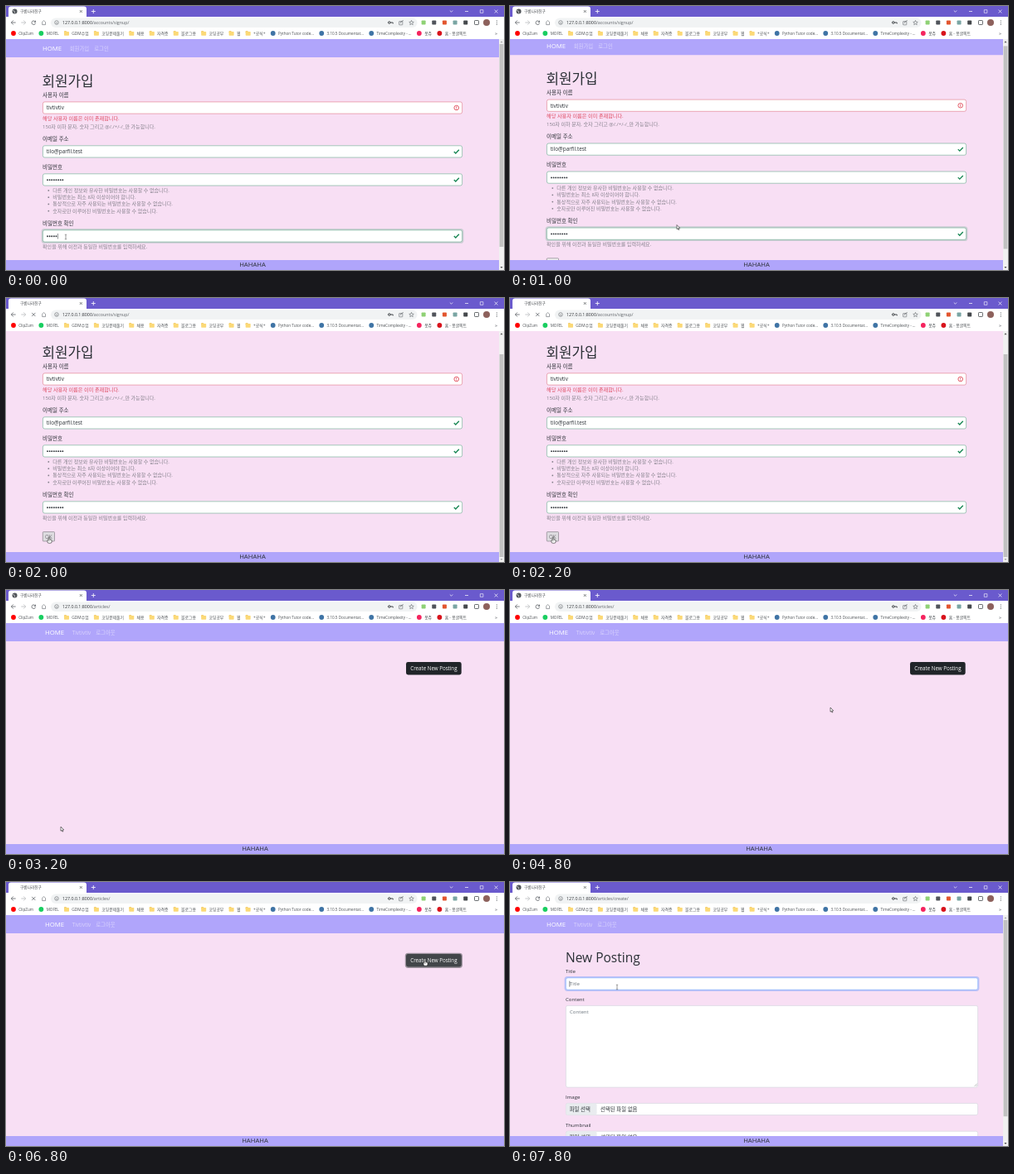
An HTML page with a canvas that plays this animation: 600x319 px, repeating every 8 s.

```html
<!DOCTYPE html>
<html lang="ko">
<head>
<meta charset="utf-8">
<title>Sign-up flow</title>
<style>
html, body { margin: 0; width: 100%; height: 100%; overflow: hidden; }
canvas { display: block; width: 600px; height: 319px; }
</style>
</head>
<body>
<canvas id="stage" width="600" height="319"></canvas>
<script>
const ctx = document.getElementById('stage').getContext('2d');
const LOOP = 8000, STEP = 200;
const FONT = '"Open Sans", "Noto Sans CJK KR", "Noto Sans CJK", sans-serif';
const PURPLE = '#6a5acd', LILAC = '#b0a5fb', PINK = '#f8dff4';
const INK = '#2b3036', MUTED = '#85808c', GREY = '#5f6368', CHROME = '#45494d';
const GREEN = '#198754', RED = '#dc3545';
const BUSY = [[2000, 3200], [6400, 7200]];
const OPEN_ARTICLES = 2400, OPEN_POSTING = 7000, FOCUS_TITLE = 7600;

// [start, end, x, y]: the pointer travels to x, y between the two times.
const moves = [
  [600, 1000, 201, 264.5], [1000, 1800, 52, 289], [2400, 2600, 66, 286],
  [4200, 4800, 386, 142], [4800, 5200, 452, 73], [5200, 5400, 432, 144],
  [5400, 6000, 505, 94], [7000, 7600, 129, 127]
];

const bookmarks = [
  ['ClipZum', '#f00'], ['MOFEL', '#19ce60'], ['GDM수업'], ['코딩문제풀기'], ['채용'],
  ['자격증'], ['블로그용'], ['코딩공부'], ['웹'], ['+공식+'],
  ['Python Tutor code...', '#3f74a5'], ['3.10.5 Documentat...', '#3f74a5'],
  ['TimeComplexity - ...', '#3f74a5'], ['봇쥬', '#f5245f'], ['홈 - 몽글픽트', '#d8131c']
];

const groups = [
  { label: '사용자 이름', value: 'tivtivtiv', error: '해당 사용자 이름은 이미 존재합니다.',
    hints: ['150자 이하 문자, 숫자 그리고 @/./+/-/_만 가능합니다.'] },
  { label: '이메일 주소', value: 'tilo@parfil.test' },
  { label: '비밀번호', secret: true, list: true, hints: [
    '다른 개인 정보와 유사한 비밀번호는 사용할 수 없습니다.',
    '비밀번호는 최소 8자 이상이어야 합니다.',
    '통상적으로 자주 사용되는 비밀번호는 사용할 수 없습니다.',
    '숫자로만 이루어진 비밀번호는 사용할 수 없습니다.'] },
  { label: '비밀번호 확인', secret: true, typed: true,
    hints: ['확인을 위해 이전과 동일한 비밀번호를 입력하세요.'] }
];

const clamp01 = v => Math.min(1, Math.max(0, v));
const progress = (t, from, to) => clamp01((t - from) / (to - from));
const between = (t, from, to) => t >= from && t < to;

// Text is placed by its left edge and optical middle.
function text(str, x, y, size, color = INK, align = 'left', weight = 400) {
  ctx.font = `${weight} ${size}px ${FONT}`;
  ctx.textAlign = align;
  ctx.fillStyle = color;
  ctx.fillText(str, x, y + size * 0.36);
  return ctx.measureText(str).width;
}

function rect(x, y, w, h, color) {
  ctx.fillStyle = color;
  ctx.fillRect(x, y, w, h);
}

function paint(fill, stroke, width = 0.6) {
  if (fill) { ctx.fillStyle = fill; ctx.fill(); }
  if (stroke) { ctx.strokeStyle = stroke; ctx.lineWidth = width; ctx.stroke(); }
}

function box(x, y, w, h, r, fill, stroke, width) {
  ctx.beginPath();
  ctx.roundRect(x, y, w, h, r);
  paint(fill, stroke, width);
}

function circle(x, y, r, fill, stroke, width) {
  ctx.beginPath();
  ctx.arc(x, y, r, 0, Math.PI * 2);
  paint(fill, stroke, width);
}

function line(color, width, ...points) {
  ctx.beginPath();
  for (const [x, y] of points) ctx.lineTo(x, y);
  paint(null, color, width);
}

function polygon(fill, stroke, ...points) {
  ctx.beginPath();
  for (const [x, y] of points) ctx.lineTo(x, y);
  ctx.closePath();
  paint(fill, stroke);
}

function cross(x, y, r, color, width = 0.7) {
  for (const s of [-1, 1]) line(color, width, [x - r, y - r * s], [x + r, y + r * s]);
}

// Arrow centred on x, y; dir is -1 for left and 1 for right.
function arrow(x, y, dir, color) {
  const tip = x + 2.7 * dir, back = x + 0.1 * dir;
  line(color, 0.8, [x - 2.7 * dir, y], [tip, y]);
  line(color, 0.8, [back, y - 2.6], [tip, y], [back, y + 2.6]);
}

function star(x, y, r) {
  const points = Array.from({ length: 10 }, (_, i) => {
    const a = (i / 5 - 0.5) * Math.PI, d = i % 2 ? r * 0.45 : r;
    return [x + d * Math.cos(a), y + d * Math.sin(a)];
  });
  polygon(null, GREY, ...points);
}

function drawTabs(loading) {
  rect(0, 0, 600, 13, PURPLE);
  box(3, 0.5, 94, 15, 3, '#fff');
  if (!loading) {
    circle(10.5, 6.5, 3, '#51555a');
    line('#fff', 0.6, [8.3, 5.4], [10, 6], [10.7, 8.6]);
  }
  text('구름나라친구', 17, 6.3, 4.7, CHROME);
  cross(90.3, 6.5, 1.4, CHROME);
  line('#fff', 0.8, [102.8, 6.5], [107.8, 6.5]);
  line('#fff', 0.8, [105.3, 4], [105.3, 9]);
  line('#fff', 0.7, [534.8, 5.5], [536.5, 7.2], [538.2, 5.5]);
  line('#fff', 0.7, [553, 6.5], [557, 6.5]);
  box(571.3, 4.7, 3.6, 3.6, 0, null, '#fff');
  cross(590.5, 6.5, 1.9, '#fff');
}

function drawToolbar(path, loading) {
  rect(0, 13, 600, 27, '#fff');
  arrow(9, 20, -1, GREY);
  arrow(21, 20, 1, '#b9bbbe');
  if (loading) cross(33.3, 20, 2.1, GREY, 0.8);
  else {
    ctx.beginPath();
    ctx.arc(33.3, 20.2, 2.3, 0.2, 5.4);
    paint(null, GREY, 0.8);
    polygon(GREY, null, [35.9, 17.2], [35.9, 19.8], [33.4, 19.8]);
  }
  polygon(null, GREY, [43.7, 22.6], [43.7, 19.4], [45.6, 17.6], [47.5, 19.4], [47.5, 22.6]);

  box(54, 14.5, 441.5, 11.5, 5.75, '#f1f3f4');
  circle(61, 20, 2.3, null, GREY);
  rect(60.7, 19.6, 0.7, 1.8, GREY);
  const host = text('127.0.0.1:8000', 68, 20, 5.3, '#33363a');
  text(path, 68 + host, 20, 5.3, GREY);

  circle(461.8, 20, 1.3, null, CHROME, 1);
  line(CHROME, 1, [463, 20], [466.2, 20], [466.2, 21.4]);
  box(473.6, 18.6, 4.2, 4.2, 0.4, null, GREY);
  line(GREY, 0.7, [475.4, 20.8], [476, 18.8], [478.8, 17.6]);
  star(488.5, 20.3, 2.9);

  ['#8fd175', '#51545b', '#e2562f', '#79a5a3', CHROME].forEach((color, i) =>
    box(500.6 + i * 12.65, 17.5, 5, 5, 0.8, color));
  box(564.5, 17.5, 5, 5, 0.7, null, CHROME, 0.8);
  circle(579, 20, 4, '#8d615c');
  for (const dy of [-2.2, 0, 2.2]) circle(591.3, 20 + dy, 0.6, GREY);
}

function drawBookmarks() {
  let x = 9;
  for (const [label, color] of bookmarks) {
    if (color) circle(x, 33, 2.9, color);
    else {
      box(x - 3, 30.2, 3, 2, 0.5, '#f0c04c');
      box(x - 3, 30.9, 6, 4.8, 0.6, '#fbd977');
    }
    const size = /[가-힣]/.test(label) ? 4.85 : 4.6;
    x += 6.3 + text(label, x + 6.3, 33, size, '#4c5054') + 9.3;
  }
  text('»', 590.5, 32.6, 6, GREY, 'center');
}

function drawNav(left, links) {
  rect(0, 40, 600, 22, LILAC);
  let x = left + text('HOME', left, 51.3, 7.8, '#fff') + 9.5;
  for (const link of links) x += text(link, x, 51.3, 6.4, '#d9d3fd') + 6;
}

function drawFooter(width) {
  rect(0, 307, width, 12, LILAC);
  text('HAHAHA', width / 2, 312.2, 7.7, INK, 'center');
}

function drawScrollbar(offset, hidden) {
  const view = 279, total = view + hidden, scale = (view - 12) / total;
  rect(594, 40, 6, view, '#f1f1f1');
  rect(594.6, 46 + offset * scale, 4.8, view * scale, '#c1c1c1');
  for (const [y, dir, off] of [[43.3, -1, offset === 0], [316.1, 1, offset === hidden]])
    polygon(off ? '#a3a3a3' : '#505050', null,
      [595.5, y - dir], [598.5, y - dir], [597, y + dir]);
}

function drawField(x, y, w, border, glow, h = 15) {
  if (glow) box(x - 1.4, y - 1.4, w + 2.8, h + 2.8, 3.6, glow);
  box(x + 0.4, y + 0.4, w - 0.8, h - 0.8, 2.2, '#fff', border);
}

// One labelled form row; returns the label position of the next row.
function drawGroup(group, y, t) {
  const top = y + 8, mid = top + 7.5;
  const focused = group.typed && t < 1800;
  text(group.label, 44, y, 6.5);
  drawField(44, top, 506, group.error ? '#e07886' : '#69a98f', focused && 'rgba(25,135,84,.2)');

  if (group.secret) {
    const count = group.typed ? Math.min(8, 5 + t / STEP) : 8;
    for (let i = 0; i < count; i++) circle(50 + i * 2.62, mid + 0.3, 0.9, INK);
    if (focused && t < 800) rect(49.2 + count * 2.62, mid - 3, 0.5, 6.5, INK);
  } else text(group.value, 48.7, mid, 6.4);

  if (group.error) {
    circle(542.7, mid, 2.8, null, RED, 0.8);
    rect(542.3, mid - 1.6, 0.8, 2, RED);
    rect(542.3, mid + 1, 0.8, 0.8, RED);
  } else line(GREEN, 1.4, [539.8, mid], [541.8, mid + 2], [545.8, mid - 2.2]);

  let row = top + 20.3;
  if (group.error) {
    text(group.error, 44, row, 6.15, '#de4a60');
    row += 9.6;
  }
  if (!group.hints) return top + 26;
  for (const hint of group.hints) {
    if (group.list) circle(51.3, row + 0.2, 0.9, MUTED);
    text(hint, group.list ? 56.3 : 44, row, 6.05, MUTED);
    row += 8.25;
  }
  return row + 6.75;
}

function drawSignup(t) {
  const scroll = 25 * progress(t, 800, 1400) ** 2;
  const pressed = t >= 1800;
  ctx.save();
  ctx.translate(0, -scroll);
  drawNav(44, ['회원가입', '로그인']);
  text('회원가입', 43.5, 91, 16.9, INK, 'left', 300);
  let y = 107.5;
  for (const group of groups) y = drawGroup(group, y, t);
  box(44.3, 307.6, 14.2, 11.3, 0.8, pressed ? '#dedce0' : '#efefef', '#77737b');
  text('OK', 51.2, 313.4, 6.2, pressed ? '#77747b' : INK, 'center');
  ctx.restore();
  drawFooter(594);
  drawScrollbar(scroll, 25);
}

function drawArticles(t) {
  drawNav(47, ['Tivtivtiv', '로그아웃']);
  if (t >= 6400) box(480.8, 85.7, 69.2, 18.2, 3.6, 'rgba(66,70,73,.5)');
  box(482, 87, 66.7, 15.5, 2.4, t >= 6000 ? '#424649' : '#212529');
  text('Create New Posting', 515.4, 95, 6.2, '#fff', 'center');
  drawFooter(600);
}

function drawFilePicker(label, y) {
  text(label, 67, y, 6.1);
  drawField(67, y + 7.2, 497, '#ced4da');
  box(67.6, y + 7.8, 37, 13.8, 2, '#e9ecef');
  text('파일 선택', 71.7, y + 14.7, 6.4);
  text('선택된 파일 없음', 109, y + 14.7, 6.4);
}

function drawPosting(t) {
  const focused = t >= FOCUS_TITLE;
  drawNav(44, ['Tivtivtiv', '로그아웃']);
  text('New Posting', 67, 91.5, 15.5);
  text('Title', 67, 107.8, 6.1);
  drawField(67, 115.5, 497, focused ? '#86b7fe' : '#ced4da', focused && 'rgba(13,110,253,.25)');
  text('Title', 72, 123.3, 6.1, '#6c757d');
  if (focused) rect(71.6, 119.6, 0.6, 7, INK);
  text('Content', 67, 141.8, 6.1);
  drawField(67, 149, 497, '#ced4da', null, 99.5);
  text('Content', 72, 156.8, 6.1, '#6c757d');
  for (const d of [1.5, 3.3]) line('#85888c', 0.5, [562.8 - d, 246.8], [562.8, 246.8 - d]);
  drawFilePicker('Image', 259.8);
  drawFilePicker('Thumbnail', 293.6);
  drawFooter(594);
  drawScrollbar(0, 35);
}

function pointerAt(t) {
  let x = 72, y = 279;
  for (const [from, to, toX, toY] of moves) {
    const k = progress(t, from, to);
    x += (toX - x) * k;
    y += (toY - y) * k;
  }
  return [x, y];
}

function drawPointer(t) {
  ctx.save();
  ctx.translate(...pointerAt(t));
  if (t < 800 || t >= FOCUS_TITLE) {
    for (const y of [-2.8, 2.8]) line('#555', 0.5, [-1.2, y], [1.2, y]);
    line('#555', 0.6, [0, -2.8], [0, 2.8]);
  } else if (between(t, 1800, 2600) || between(t, 6000, 7200)) {
    box(-2, 2.8, 5, 4.4, 1.4, '#fff', '#222');
    box(-0.7, 0, 1.5, 4.6, 0.7, '#fff', '#222');
    rect(-0.4, 3, 0.9, 2, '#fff');
  } else {
    polygon('#fff', '#222', [0, 0], [0, 5.2], [1.2, 4.2], [2, 6.1], [2.8, 5.7], [2.1, 3.9], [3.7, 3.8]);
  }
  ctx.restore();
}

function draw(now) {
  const t = Math.floor((now % LOOP) / STEP) * STEP;
  const [drawPage, path] =
    t < OPEN_ARTICLES ? [drawSignup, '/accounts/signup/'] :
    t < OPEN_POSTING ? [drawArticles, '/articles/'] : [drawPosting, '/articles/create/'];
  const loading = BUSY.some(([from, to]) => between(t, from, to));
  rect(0, 0, 600, 319, PINK);
  drawPage(t);
  drawTabs(loading);
  drawToolbar(path, loading);
  drawBookmarks();
  drawPointer(t);
}

const start = performance.now();
function tick() {
  draw(performance.now() - start);
  requestAnimationFrame(tick);
}
tick();
</script>
</body>
</html>
```
